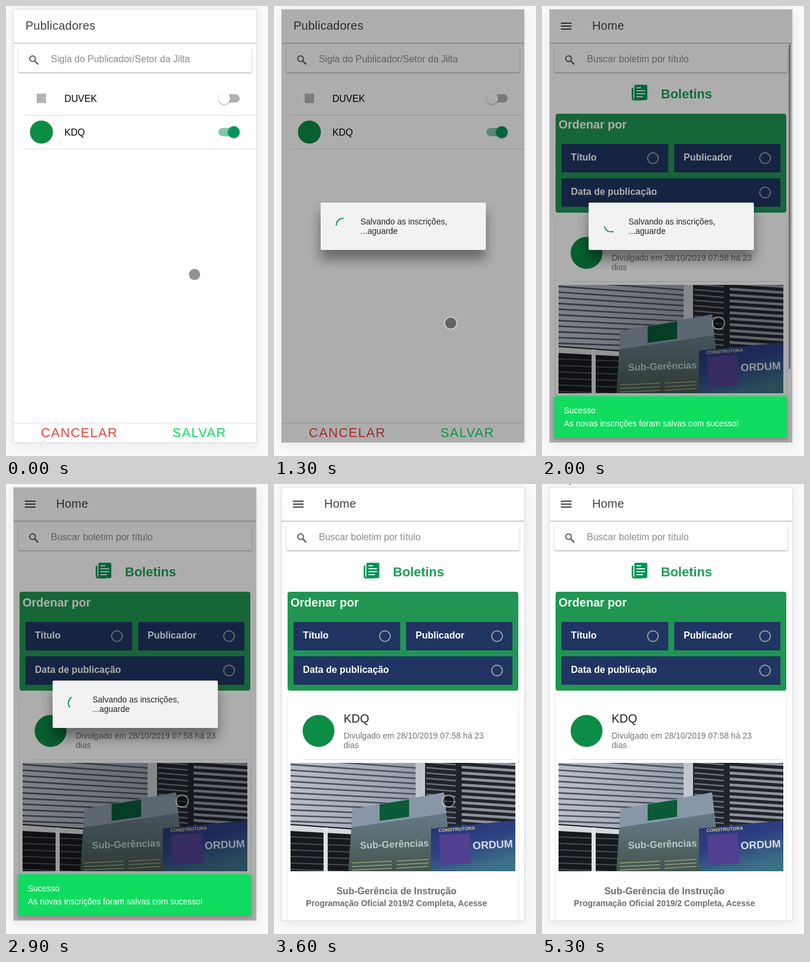
Recreate the animation shown at these times as an HTML page. Size 444 by 760 pixels, loop 6000 ms.

```html
<!DOCTYPE html>
<html lang="pt-BR">
<head>
<meta charset="utf-8">
<style>
html, body { margin: 0; width: 100%; height: 100%; overflow: hidden; background: #fafafa; }
svg { display: block; font-family: "Liberation Sans", Arial, sans-serif; }
.b { font-weight: bold; }
.title { letter-spacing: .25px; }
.btn { letter-spacing: 1.32px; }
.frame { filter: drop-shadow(0 4px 9px rgba(0,0,0,.08)); }
.head { filter: drop-shadow(0 1px 1px rgba(0,0,0,.38)); }
.box { filter: drop-shadow(0 1px 1.3px rgba(0,0,0,.38)); }
.card { filter: drop-shadow(0 1px 1.2px rgba(0,0,0,.25)); }
.modal { filter: drop-shadow(0 16px 10px rgba(0,0,0,.4)); }
.snack { filter: drop-shadow(0 3px 4px rgba(0,0,0,.28)); }
</style>
</head>
<body>
<script>
const GREEN = '#009456';

const rect = (x, y, w, h, fill, more = '') =>
  `<rect x="${x}" y="${y}" width="${w}" height="${h}" fill="${fill}" ${more}/>`;
const text = (x, y, size, fill, str, more = '') =>
  `<text x="${x}" y="${y}" font-size="${size}" fill="${fill}" ${more}>${str}</text>`;
const disc = (x, y, r, fill, more = '') =>
  `<circle cx="${x}" cy="${y}" r="${r}" fill="${fill}" ${more}/>`;
const path = (d, stroke, width, fill = 'none', more = '') =>
  `<path d="${d}" stroke="${stroke}" stroke-width="${width}" fill="${fill}" ${more}/>`;
const shape = (d, fill) => path(d, 'none', 0, fill);
const fade = (id, dir, ...colors) =>
  `<linearGradient id="${id}" ${dir}>` + colors.map((c, i) =>
    `<stop offset="${i / (colors.length - 1)}" stop-color="${c}"/>`).join('') + '</linearGradient>';

const header = (title, x) =>
  rect(13, 6, 411, 56, '#fff', 'class="head"') +
  text(x, 40, 20, '#424242', title, 'class="title"');

const search = hint =>
  rect(21, 70, 395, 42, '#fff', 'rx="2" class="box"') +
  disc(45, 89, 4.8, 'none', 'stroke="#5b5b5b" stroke-width="2"') +
  path('M48.6 92.6L54.6 98.6', '#5b5b5b', 2.4) +
  text(76, 95, 16, '#8c8c8c', hint);

const toggle = (y, on) =>
  rect(360, y - 7, 36, 14, on ? '#7fc9aa' : '#b1b1b1', 'rx="7"') +
  disc(on ? 386 : 370, y, 10, on ? GREEN : '#fff', 'class="box"');

const row = (y, name, on) =>
  text(99, y + 5.5, 16, '#000', name) + toggle(y, on) +
  rect(29, y + 28, 395, 1, '#dcdcdc');

const option = (x, y, w, name) =>
  rect(x, y, w, 48, '#203562') +
  rect(x + 16, y + 47, w - 16, 1, 'rgba(0,0,0,.13)') +
  text(x + 16, y + 28, 16, '#fff', name, 'class="b"') +
  disc(x + w - 26, y + 24, 9, 'none', 'stroke="#9b9c9e" stroke-width="2"');

// Slats of a blind: n lines across x1..x2, each end with its own spacing
const slats = (n, x1, y1, gap1, x2, y2, gap2, color, width) => {
  let d = '';
  for (let i = 0; i < n; i++) d += `M${x1} ${y1 + i * gap1}L${x2} ${y2 + i * gap2}`;
  return path(d, color, width);
};

const photo = `<g clip-path="url(#pic)">` +
  fade('wall', '', '#b9bfc8', '#9aa1ae', '#747c8b') +
  fade('sign', 'x2="0" y2="1"', '#71829a', '#5c7177', '#42544c') +
  fade('poster', 'x2=".5" y2="1"', '#27346f', '#2c3f83', '#3c7086') +
  rect(28, 471, 381, 183, 'url(#wall)') +
  slats(13, 28, 464, 9.6, 246, 480, 8.8, '#4b525e', 2.6) +
  shape('M28 574L140 582V654H28Z', '#15181c') +
  shape('M28 576L140 584V592L28 586Z', '#d5d8db') +
  slats(6, 28, 596, 11, 140, 600, 11, '#474d53', 2) +
  shape('M84 580H91V654H84Z', '#dfe1e2') +
  shape('M240 471H256V540H240Z', '#c3c6ca') +
  shape('M256 471H409V600H256Z', '#20242a') +
  slats(12, 258, 470, 9, 308, 474, 9, '#6a717b', 2.5) +
  slats(12, 318, 468, 10, 409, 474, 10, '#8d939d', 4.5) +
  shape('M133 549L288 521L297 600L268 654H126Z', 'url(#sign)') +
  shape('M133 549L288 521L292 556L131 580Z', '#8997a8') +
  shape('M179 541L229 533V562L179 569Z', '#0b5a38') +
  text(146, 616, 16.5, '#b9c8c6', 'Sub-Gerências', 'class="b" transform="rotate(-2 146 616)"') +
  slats(3, 132, 640, 6, 200, 637, 6, '#95a07c', 1.5) +
  slats(3, 208, 637, 6, 262, 634, 6, '#95a07c', 1.5) +
  shape('M266 582L409 568V654H266Z', 'url(#poster)') +
  rect(281, 591, 52, 51, '#50408f', 'transform="rotate(-3 307 616)"') +
  text(279, 588, 8, '#d8d28a', 'CONSTRUTORA', 'class="b" transform="rotate(-4 279 588)"') +
  text(337, 617, 18, '#d9dcec', 'ORDUM', 'class="b" transform="rotate(-3 337 617)"') +
  '</g>';

const listPage =
  rect(13, 6, 411, 731, '#fff') + header('Publicadores', 33) +
  search('Sigla do Publicador/Setor da Jilta') +
  row(156, 'DUVEK', false) + row(213, 'KDQ', true) +
  rect(52, 148, 16, 16, '#b5b5b5') + disc(60, 213, 19.5, '#0c8c45') +
  rect(13, 704, 411, 1, '#dedede') +
  text(59, 728, 22, '#eb423f', 'CANCELAR', 'class="btn"') +
  text(282, 728, 22, '#10dc60', 'SALVAR', 'class="btn"');

const homePage =
  rect(13, 6, 411, 731, '#fff') + header('Home', 85) +
  path('M32 29H50M32 34H50M32 39H50', '#424242', 2) +
  search('Buscar boletim por título') +
  rect(156.5, 133, 22, 26, GREEN, 'rx="2.5"') +
  path('M153.4 138V156Q153.4 158 156 158H170', GREEN, 2.8) +
  path('M160 138.2H168M160 143.2H174.5M160 148.2H174.5M160 153.2H171', '#fff', 1.7) +
  text(201.5, 156, 22, '#1fa056', 'Boletins', 'class="b"') +
  rect(23, 182, 391, 167, '#209652', 'rx="4"') +
  text(28, 207, 20, '#fff', 'Ordenar por', 'class="b"') +
  option(33, 233, 181, 'Título') + option(224, 233, 180, 'Publicador') +
  option(33, 291, 371, 'Data de publicação') +
  '<g id="card">' +
  rect(23, 359, 391, 400, '#fff', 'rx="3" class="card"') +
  disc(75.5, 417, 27, '#0c8c45') +
  text(118, 403, 20, '#222', 'KDQ') +
  text(118, 430, 14, '#757575', 'Divulgado em 28/10/2019 07:58 há 23') +
  text(118, 446, 14, '#757575', 'dias') +
  rect(49, 465, 356, 1, '#dcdcdc') + photo +
  text(207.5, 693, 16, '#6e6e6e', 'Sub-Gerência de Instrução', 'class="b" text-anchor="middle"') +
  text(207.5, 713, 14, '#6e6e6e', 'Programação Oficial 2019/2 Completa, Acesse', 'class="b" text-anchor="middle"') +
  rect(418, 65, 3, 548, 'rgba(0,0,0,.38)', 'id="bar"') + '</g>';

const loading =
  rect(13, 6, 411, 731, 'rgba(0,0,0,.32)') +
  rect(79, 332, 280, 80, '#f2f2f2', 'rx="2" class="modal"') +
  disc(117, 370, 11.4, 'none', `id="spin" stroke="${GREEN}" stroke-width="1.8" stroke-dasharray="20.1 100"`) +
  text(146.5, 369, 14, '#262626', 'Salvando as inscrições,') +
  text(146.5, 385, 14, '#262626', '...aguarde');

const toast =
  rect(21, 659, 394, 70, '#10dc60', 'rx="3" class="snack"') +
  text(37, 688, 14, '#fff', 'Sucesso') +
  text(37, 710, 14, '#fff', 'As novas inscrições foram salvas com sucesso!');

const status =
  shape('M13 715H145Q148 715 148 718V737H13Z', '#333') +
  text(18, 731, 15, '#d6d6d6', 'Waiting for cac...', 'font-family="Noto Sans, sans-serif"');

document.body.innerHTML = `<svg width="444" height="760" viewBox="0 0 444 760">
<clipPath id="app"><rect x="13" y="6" width="411" height="731"/></clipPath>
<clipPath id="pic"><rect x="28" y="471" width="381" height="183"/></clipPath>
${rect(12.5, 5.5, 412, 732, '#fff', 'stroke="#dcdcdc" class="frame"')}
<g clip-path="url(#app)">
<g id="list">${listPage}</g><g id="home">${homePage}</g><g id="load">${loading}</g>
<g id="toast">${toast}</g><g id="status">${status}</g>
</g>
<g id="touch">${disc(0, 0, 9.6, 'rgba(0,0,0,.43)')}${disc(0, 0, 10.3, 'none', 'stroke="rgba(255,255,255,.5)" stroke-width="1.6"')}</g>
<g id="arrow">${path('M0 0V16L4 12.5L6.5 18.5L9 17.5L6.5 11.5H12Z', '#fff', 1, '#222')}</g>
</svg>`;

const el = {};
for (const id of ['home', 'card', 'bar', 'load', 'spin', 'toast', 'status', 'touch', 'arrow'])
  el[id] = document.getElementById(id);

// [ms, x, y]
const touchPath = [
  [0, 319.5, 453.5], [300, 307, 720.5], [1200, 307, 720.5], [1300, 299.5, 535.5],
  [3000, 298.5, 535.5], [3100, 295.5, 535.5], [3700, 295.5, 535.5], [4000, 115.5, 222.5],
  [4200, 115.5, 222.5], [4500, 52, 38], [4600, 52, 38], [4700, 43.5, 10.5]
];
const arrowPath = [[4900, 36, 1], [5300, 40, -16.3]];

const clamp = (v, lo = 0, hi = 1) => Math.min(hi, Math.max(lo, v));
const decay = (t, start, rate) => t < start ? 1 : Math.exp((start - t) / rate);

function place(node, keys, t) {
  let i = 0;
  while (i < keys.length - 2 && t >= keys[i + 1][0]) i++;
  const [a, b] = [keys[i], keys[i + 1]];
  const p = clamp((t - a[0]) / (b[0] - a[0]));
  move(node, a[1] + (b[1] - a[1]) * p, a[2] + (b[2] - a[2]) * p);
}
const move = (node, x, y) => node.setAttribute('transform', `translate(${x} ${y})`);
const show = (node, on, opacity = 1) => {
  node.style.display = on ? '' : 'none';
  node.style.opacity = opacity;
};

function draw(t) {
  const left = t < 1900 ? decay(t, 1570, 56) : 0;
  show(el.home, t >= 1600, 1 - left);
  move(el.home, 0, 40 * left);
  show(el.card, t >= 1900);
  show(el.bar, t < 2900, clamp(1 - (t - 2500) / 400));

  show(el.load, t >= 1300 && t < 3600);
  const beat = t < 1600 ? Math.min(t, 1400) : Math.min(t, 3300);
  const angle = beat * .48 + (t < 1600 ? 271 : 188);
  el.spin.setAttribute('transform', `rotate(${angle % 360} 117 370)`);

  show(el.toast, t >= 1900 && t < 3600, clamp(1 - (t - 2970) / 355, .07));
  move(el.toast, 0, t < 2000 ? 78 * decay(t, 1870, 30) : 0);
  show(el.status, t >= 1600 && t < 1900);

  show(el.touch, t < 4900);
  place(el.touch, touchPath, t);
  show(el.arrow, t >= 4900);
  place(el.arrow, arrowPath, t);
}

// The picture advances in steps of 100 ms
const began = performance.now();
function tick() {
  const t = (performance.now() - began) % 6000;
  draw(Math.floor(t / 100) * 100);
  requestAnimationFrame(tick);
}
tick();
</script>
</body>
</html>
```
